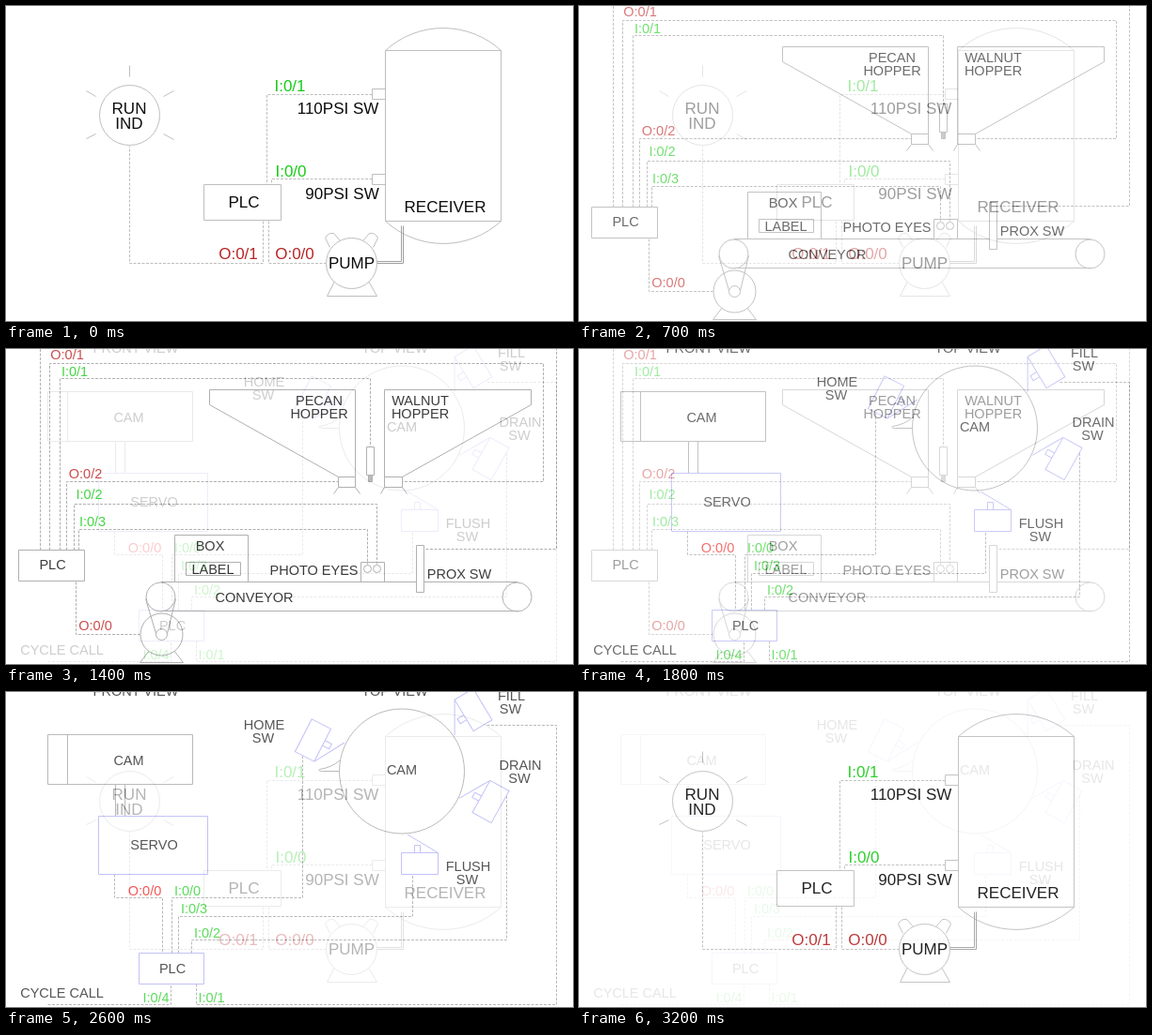
Animation, 603 px wide and 336 px high, one loop 3.3 s. Source, as an HTML page:

```html
<!DOCTYPE html>
<html>
<head>
<meta charset="utf-8">
<style>
html, body { margin: 0; width: 100%; height: 100%; overflow: hidden; background: #fff; }
svg { position: absolute; left: 0; top: 0; background: #fff; --line: #9c9c9c; --out: #c02020; }
text { font-family: "Liberation Sans", Arial, sans-serif; text-anchor: middle; fill: #0c0c0c; }
.big { --line: #bebebe; --out: #b82424; }
.vivid { --out: #f01010; }
.big text { font-size: 17px; }
.mid text { font-size: 14.5px; }
text.in { fill: #14cc14; }
text.out { fill: var(--out); }
path, circle { fill: none; stroke: var(--line); stroke-width: 1; }
.wire { stroke-dasharray: 3 1.5; }
.blue, .blue * { stroke: #a8a8f4; }
.pipe { stroke: #a0a0a0; }
.solid { fill: #fff; }
.dark { fill: #aaa; }
</style>
</head>
<body>
<script>
const W = 603, H = 336;

const path = (d, cls = '') => `<path class="${cls}" d="${d}"/>`;
const wire = d => path(d, 'wire');
const circle = (x, y, r, cls = '') => `<circle class="${cls}" cx="${x}" cy="${y}" r="${r}"/>`;
// Rectangle from its left, top, right and bottom edges
const box = (l, t, r, b, cls = '') => path(`M${l} ${t}H${r}V${b}H${l}Z`, cls);
// Text centred on x; addresses are coloured by direction
const label = (s, x, y) => {
  const cls = s.startsWith('I:') ? 'in' : s.startsWith('O:') ? 'out' : '';
  return `<text class="${cls}" x="${x}" y="${y}">${s}</text>`;
};
const labels = list => list.map(a => label(...a)).join('');
// Limit switch with plunger and lever, centred on x, y
const limitSwitch = (x, y, angle) =>
  `<g class="blue" transform="translate(${x} ${y}) rotate(${angle})">` +
  path('M-19.5-11.5H19.5V11.5H-19.5ZM-5.5-11.5V-19.5H.5V-11.5M19.5-11.5L-13-31') + '</g>';

const compressor = {
  cls: 'big',
  lines: [
    path('M403 47A91 91 0 0 1 526 47V229A91 91 0 0 1 403 229ZM403 47H526M403 229H526'),
    box(389, 88, 403, 99), box(389, 179, 403, 190),
    box(210, 190, 292, 228),
    wire('M389 94H277V190'), wire('M389 184H282V190'),
    wire('M273 229V274H131V149'), wire('M279 229V274H340'),
    circle(131, 116, 32),
    path('M131 63V75M85 90L95 96M167 96L178 90M85 141L95 136M167 136L178 142'),
    path('M344 257L339 247Q342 241 348 242L355 250M390 257L395 247Q392 241 386 242L379 250'),
    path('M349 293L341 309H394L385 293'),
    circle(367, 274, 27, 'solid'),
    path('M394 272H420V234M394 274H422V234', 'pipe')
  ],
  texts: [
    ['RUN', 131, 115], ['IND', 131, 131], ['PLC', 253, 215],
    ['I:0/1', 302, 90.5], ['110PSI SW', 353, 114.5],
    ['I:0/0', 303, 181.5], ['90PSI SW', 357.5, 206],
    ['RECEIVER', 467, 220], ['PUMP', 367.5, 280],
    ['O:0/1', 247, 270], ['O:0/0', 307, 270]
  ]
};

const conveyor = {
  cls: 'mid',
  lines: [
    box(13, 214, 83, 247),
    wire('M36 214V-2H585V213H445'), wire('M46 214V15H571V141H421'),
    wire('M57 214V31H387V104'), wire('M64 214V141H353'),
    wire('M72 214V165H394V229'), wire('M77 214V192H384V229'),
    wire('M74 248V304H142'),
    path('M371 136V43H216V59L353 136M402 136V43H558V59L421 136'),
    box(353, 136, 371, 147), box(402, 136, 421, 147),
    path('M353 147L348 154M371 147L376 154M402 147L398 154M421 147L426 154'),
    box(383, 104, 391, 134), box(385, 134, 389, 141, 'dark'),
    box(179, 198, 257, 248), box(191, 227, 249, 241),
    box(377, 227, 402, 248), circle(384, 234, 4), circle(394, 234, 4),
    path('M164 248H544M164 279H544'),
    circle(164, 264, 15.5), circle(543, 264, 15.5),
    path('M152 321L142 334H188L178 321'),
    circle(165, 304, 22.5, 'solid'), circle(165, 304, 6),
    path('M148 266L159 303M180 266L171 303'),
    box(436, 209, 444, 259, 'solid')
  ],
  texts: [
    ['O:0/1', 65, 11], ['I:0/1', 73, 29], ['O:0/2', 84.5, 138],
    ['I:0/2', 88.5, 160], ['I:0/3', 92, 189], ['O:0/0', 95, 300],
    ['PLC', 49.5, 235], ['PECAN', 333, 60], ['HOPPER', 333, 74],
    ['WALNUT', 440.5, 60], ['HOPPER', 440.5, 74],
    ['BOX', 217, 215], ['LABEL', 220, 240], ['PHOTO EYES', 327.5, 241],
    ['PROX SW', 482, 245], ['CONVEYOR', 264, 270]
  ]
};

const camTimer = {
  cls: 'mid vivid',
  lines: [
    box(44, 45, 198, 98), path('M65 45V98M116 98V132M126 98V132'),
    box(98, 132, 214, 194, 'blue'), box(141, 278, 210, 311, 'blue'),
    wire('M115 194V219H166V278'), wire('M176 278V219H315V68'),
    wire('M183 278V239H432V194'), wire('M197 278V264H532V110'),
    wire('M44 333H175V311'), wire('M202 311V333H585V35H510'),
    circle(420.5, 84, 66.5),
    path('M355 72Q346 80 333 82Q331 84 336 84H354'),
    limitSwitch(326, 51, 117), limitSwitch(496.5, 18.5, 239),
    limitSwitch(515, 116.5, 299), limitSwitch(439.5, 182.5, 0)
  ],
  texts: [
    ['FRONT VIEW', 138, 4], ['TOP VIEW', 413.5, 4],
    ['CAM', 130.5, 78], ['SERVO', 157.5, 168], ['CAM', 421, 88],
    ['HOME', 274.5, 40], ['SW', 273.5, 54], ['FILL', 537.5, 9], ['SW', 536.5, 23],
    ['DRAIN', 547, 83], ['SW', 546, 97], ['FLUSH', 491.5, 191], ['SW', 490.5, 205],
    ['O:0/0', 147.5, 217], ['I:0/0', 193, 217], ['I:0/3', 200, 236],
    ['I:0/2', 214, 262], ['I:0/4', 159.5, 331], ['I:0/1', 218.5, 331],
    ['PLC', 177, 300], ['CYCLE CALL', 59.5, 326]
  ]
};

document.body.innerHTML = [compressor, conveyor, camTimer].map(s =>
  `<svg class="${s.cls}" width="${W}" height="${H}" viewBox="0 0 ${W} ${H}">` +
  `<g transform="translate(.5 .5)">${s.lines.join('')}</g>${labels(s.texts)}</svg>`).join('');
const scenes = [...document.querySelectorAll('svg')];

// Each scene holds for 200 ms, then dissolves into the next in ten steps
const SPAN = 1100, HOLD = 200, STEP = 100;
const start = performance.now();

function draw() {
  const t = (performance.now() - start) % (SPAN * scenes.length);
  const current = Math.floor(t / SPAN), next = (current + 1) % scenes.length;
  const mix = Math.max(0, Math.floor((t % SPAN - HOLD) / STEP) + 1) / 10;
  scenes.forEach((s, i) => {
    s.style.zIndex = i === next ? 2 : i === current ? 1 : 0;
    s.style.opacity = i === next ? mix : 1;
  });
  requestAnimationFrame(draw);
}
draw();
</script>
</body>
</html>
```
